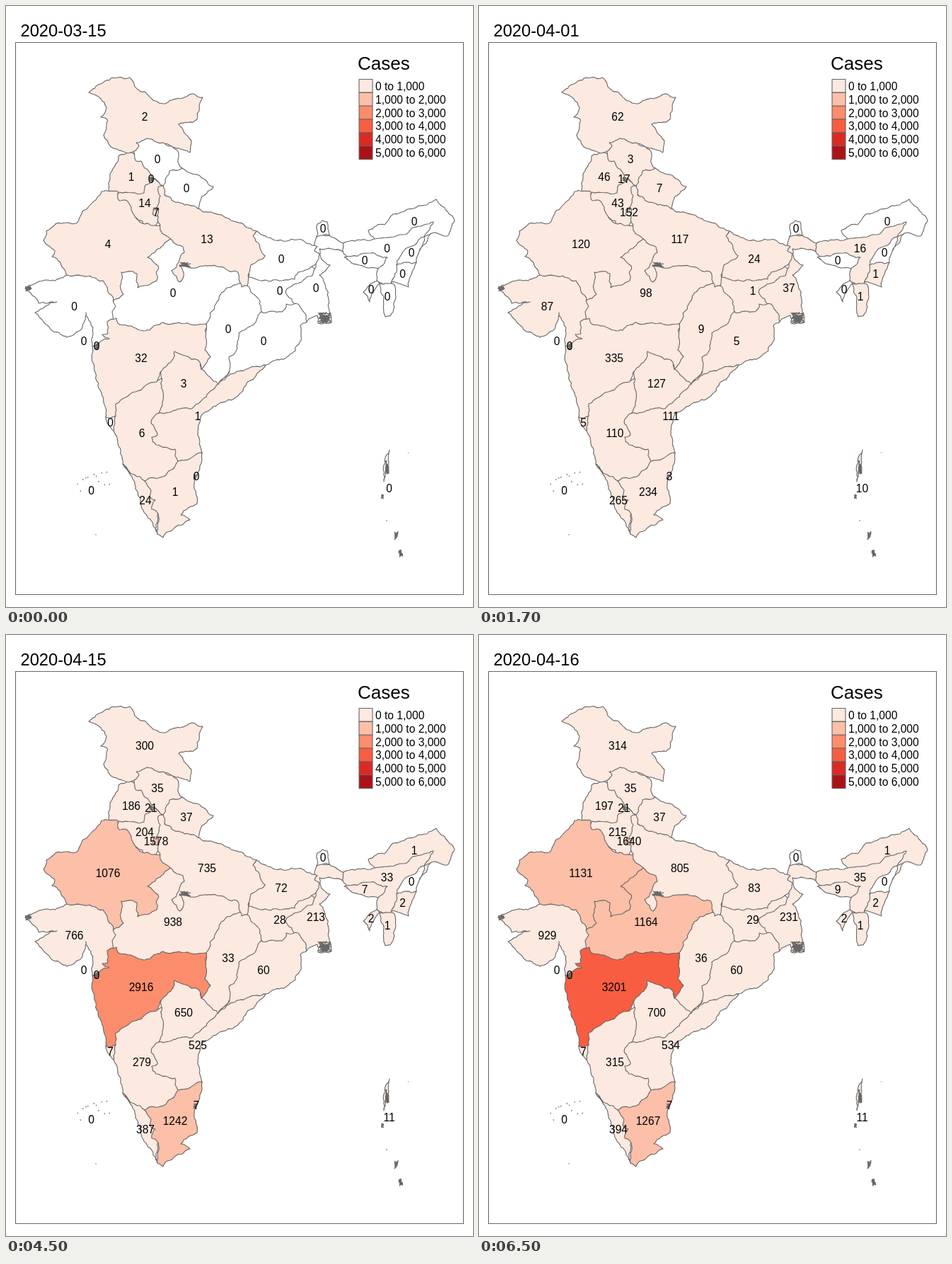
These frames come from a looping animation (660 px wide and 849 px high, 8000 ms). An HTML page:

```html
<!DOCTYPE html>
<html lang="en">
<head>
<meta charset="utf-8">
<title>Cases by state</title>
<style>
html, body { margin: 0; width: 100%; height: 100%; overflow: hidden; background: #fff; }
svg { display: block; width: 660px; height: 849px; font: 15.6px "Liberation Sans", Arial, sans-serif; }
path, rect { stroke: #666; stroke-width: 1.1; stroke-linejoin: round; }
.label { text-anchor: middle; }
</style>
</head>
<body>
<svg id="map" viewBox="0 0 660 849"></svg>
<script>
const STARTS = [0, 500, 2500, 4500, 6500], LOOP = 8000;
const DATES = ['2020-03-15', '2020-04-01', '2020-04-14', '2020-04-15', '2020-04-16'];
const REDS = ['#fce9df', '#fcbfa8', '#fc8d6c', '#f85d42', '#dc2924', '#ac1117'];
const svg = document.getElementById('map');
const states = [];

let seed = 7;
const rand = () => (seed = seed * 16807 % 2147483647) / 2147483647;

function add(tag, attrs, text = '') {
  const el = document.createElementNS('http://www.w3.org/2000/svg', tag);
  for (const k in attrs) el.setAttribute(k, attrs[k]);
  el.textContent = text;
  return svg.appendChild(el);
}

// Splits an edge at its displaced middle until the pieces are short.
function rough([x, y], [u, v]) {
  const len = Math.hypot(u - x, v - y);
  if (len < 5) return `L${u.toFixed(1)} ${v.toFixed(1)}`;
  const k = (rand() * 2 - 1) * Math.min(0.16, 2.2 / len);
  const mid = [(x + u) / 2 - (v - y) * k, (y + v) / 2 + (u - x) * k];
  return rough([x, y], mid) + rough(mid, [u, v]);
}

// Later states cover earlier ones, so each border is described only once.
function state(x, y, cases, points = '') {
  const pts = points.split(' ').map(p => p.split(',').map(Number));
  const d = points && 'M' + pts[0] + pts.map((p, i) => rough(p, pts[(i + 1) % pts.length])).join('') + 'Z';
  states.push({ x, y, cases: cases.split(' '), shape: add('path', { d }) });
}

function scribble(x, y, w, h) {
  let d = '';
  for (let i = 0; i < 6 + w * h / 5; i++) {
    d += (i ? 'L' : 'M') + (x + rand() * w).toFixed(1) + ' ' + (y + rand() * h).toFixed(1);
  }
  add('path', { d, fill: 'none' });
}

add('rect', { x: 13.5, y: 51.5, width: 633, height: 780, fill: 'none' });
const title = add('text', { x: 20.5, y: 42.5, 'font-size': 23.7 });

// Centre and north
state(236, 406, '0 98 741 938 1164', '150,380 232,322 265,340 340,375 290,465 140,460');
state(196, 279, '14 43 198 204 215', '165,258 200,240 220,252 224,300 205,318 150,268');
state(255, 258, '0 7 37', '249,229 281,245 293,255 277,269 272,286 245,283 221,265 216,243 235,222');
state(177, 242, '1 46 184 186 197', '176,207 159,212 147,241 145,260 152,270 160,263 195,264 197,253 206,249 215,235 195,205');
state(214, 217, '0 3 33 35', '249,229 231,233 222,254 206,243 191,219 184,219 178,200 200,180 241,203');
state(196, 157, '2 62 278 300 314', '176,207 150,200 138,182 143,160 134,157 142,143 134,131 117,122 134,110 158,101 175,101 185,117 222,138 264,124 278,129 270,160 244,167 262,190 260,207 222,193 199,187 184,193 188,198');

// South
state(192, 604, '6 110 260 279 315', '152,600 158,618 165,647 181,667 215,675 252,634 222,525 160,540 148,590');
state(271, 580, '1 111 484 525 534', '367,507 337,538 322,555 293,566 277,577 273,590 277,631 262,648 243,643 239,626 212,620 206,609 214,606 205,588 216,575 290,530 316,508 345,500');
state(251, 534, '3 127 644 650 700', '219,521 222,545 216,575 264,568 300,534 285,490 225,480');
state(197, 699, '24 265 386 387 394', '165,647 176,663 190,700 214,746 216,695 207,675 196,671 181,662');
state(239, 687, '1 234 1204 1242 1267', '277,631 243,643 222,665 196,671 205,684 203,693 211,698 206,711 215,717 214,746 222,751 238,737 260,726 247,719 270,703 267,668');
state(147.5, 589, '0 5 7', '141,581 145,592 152,600 155,579 148,570');

// East
state(387, 403, '0 1 27 28 29', '338,380 420,365 441,372 400,435 365,445 345,420');
state(438, 399, '0 37 190 213 231', '425,446 440,437 441,448 460,447 450,391 443,380 458,366 446,358 443,343 460,343 476,347 477,335 457,324 439,326 430,355 438,364 433,381 407,393 395,404');
state(448, 315, '0', '439,326 440,308 447,303 454,305 457,324');
state(389, 358, '0 24 66 72 83', '354,318 380,331 412,330 440,340 436,346 443,350 438,364 413,376 408,386 374,389 343,383 345,330');
state(314, 457, '0 9 33 33 36', '329,392 309,402 297,420 283,449 275,490 276,513 300,534 318,514 345,460 364,438 358,415 341,395');
state(364, 474, '0 5 60', '367,507 409,487 415,475 416,452 425,446 413,421 396,421 390,432 360,432 346,452 329,462 326,486 315,496 316,514 300,534 317,520');

// West, then the large northern plain
state(96.5, 425, '0 87 650 766 929', '86,380 39,393 27,399 46,420 72,418 41,433 67,460 86,468 107,456 113,433 123,462 122,481 155,475 155,450 150,432 155,424 150,395 110,370');
state(144, 337, '4 120 1005 1076 1131', '86,380 72,357 65,354 69,346 53,331 57,318 71,307 99,307 109,289 135,262 158,262 160,275 172,276 180,294 196,308 219,309 235,328 200,355 215,367 213,388 186,398 185,378 163,376 166,407 152,416 137,388');
state(191, 498, '32 335 2680 2916 3201', '122,481 146,470 136,464 144,463 143,446 156,441 158,448 203,458 222,447 283,449 281,486 289,495 276,513 271,500 238,488 236,499 221,514 213,531 183,545 155,562 155,579 141,581 131,540');
state(284, 330, '13 117 660 735 805', '271,286 318,303 354,318 349,325 366,353 346,366 341,395 333,397 326,375 298,368 245,366 251,382 246,390 234,374 252,348 250,340 218,317 212,286 218,268 215,256 222,254 224,267');

// North-east
state(538.5, 343, '0 16 33 33 35', '477,335 521,329 575,302 612,300 606,316 585,345 560,375 538,397 524,388 526,371 482,358 476,347');
state(507, 360, '0 0 1 7 9', '478,355 515,349 539,355 526,371 490,364');
state(577, 305, '0 0 1', '521,329 512,317 535,309 547,294 595,281 608,273 613,280 634,303 624,325 606,320 591,326 604,305 557,323');
state(573, 349, '0', '591,326 580,362 565,372 552,366 562,346');
state(539, 411, '0 1', '549,394 551,411 543,438 536,439 528,392');
state(560.5, 379, '0 1 2', '580,362 569,397 545,390 552,366');
state(516, 401, '0 0 2', '528,392 514,418 505,404 524,388');

// Small territories
state(212, 292, '7 152 1561 1578 1640', '208,287 216,287 214,297 207,294');
state(541.5, 682, '0 10 11', '542,627 538,634 536,645 534,672 541,645');
state(205, 245, '0 17 21');
state(269, 665, '0 3 7');
state(128, 481, '0');
state(110, 474, '0');
state(120.5, 685, '0');

// Tidal creeks, enclaves and islands
scribble(441, 433, 19, 15);
scribble(27, 396, 9, 9);
scribble(244, 362, 18, 7);
scribble(203, 240, 5, 8);
scribble(125, 476, 6, 9);
scribble(265, 662, 6, 7);
scribble(536, 640, 5, 22);
scribble(530, 689, 4, 7);
scribble(549, 742, 5, 12);
scribble(555, 768, 6, 13);
for (let i = 0; i < 13; i++) {
  add('path', { d: `M${101 + i * 3.8} ${657 + rand() * 28}l${rand() * 2 - 1} 1.8` });
}
add('path', { d: 'M127 746v1.5M568 631h1M537 727h2' });

for (const s of states) s.label = add('text', { x: s.x, y: s.y + 5.4, class: 'label' });

add('text', { x: 497, y: 89.5, 'font-size': 26 }, 'Cases');
const thousands = n => n ? n + ',000' : '0';
REDS.forEach((fill, i) => {
  const y = 103.5 + i * 18.85;
  add('rect', { x: 499, y, width: 19, height: 18.85, fill });
  add('text', { x: 522, y: y + 15.3 }, `${thousands(i)} to ${thousands(i + 1)}`);
});

let shown = -1;
const begin = performance.now();
function tick() {
  const t = (performance.now() - begin) % LOOP;
  const step = STARTS.filter(s => s <= t).length - 1;
  if (step !== shown) {
    shown = step;
    title.textContent = DATES[step];
    for (const s of states) {
      // A short series keeps its last value.
      const n = +(s.cases[step] ?? s.cases[s.cases.length - 1]);
      s.label.textContent = n;
      s.shape.setAttribute('fill', n ? REDS[Math.floor(n / 1000)] : '#fff');
    }
  }
  requestAnimationFrame(tick);
}
tick();
</script>
</body>
</html>
```
